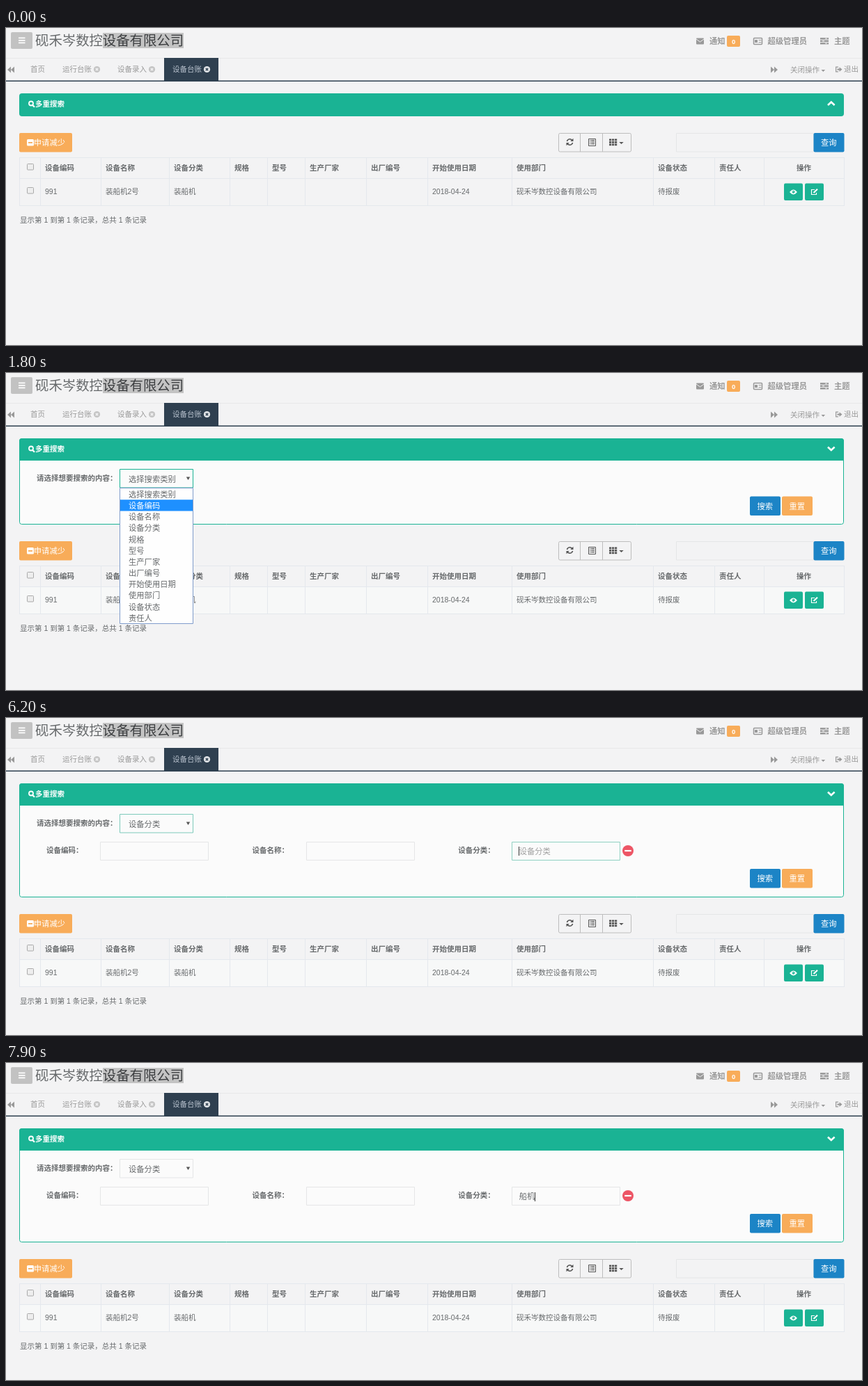
An HTML page with a canvas for the animation above (8 s loop, 1229 px wide and 456 px high).

```html
<!DOCTYPE html>
<html lang="zh-CN">
<head>
<meta charset="utf-8">
<title>设备台账</title>
<style>
html, body { margin: 0; width: 100%; height: 100%; overflow: hidden; background: #f3f3f4; }
canvas { display: block; }
</style>
</head>
<body>
<canvas id="stage" width="1229" height="456"></canvas>
<script>
const ctx = document.getElementById('stage').getContext('2d');
const LOOP = 8000, PAGE = '#f3f3f4', INK = '#676a6c', GREEN = '#1ab394', ORANGE = '#f8ac59',
  BLUE = '#1c84c6', NAVY = '#2f4050', GRAY = '#999', EDGE = '#e5e6e7', SMALL = 10.5, MEDIUM = 11.3;

const OPTIONS = ['选择搜索类别', '设备编码', '设备名称', '设备分类', '规格', '型号', '生产厂家',
  '出厂编号', '开始使用日期', '使用部门', '设备状态', '责任人'];
const COMPANY = ['砚禾岑数控', '设备有限公司'];
const COLUMNS = [[49, '设备编码', '991'], [136, '设备名称', '装船机2号'], [234, '设备分类', '装船机'],
  [321, '规格'], [375, '型号'], [429, '生产厂家'], [517, '出厂编号'], [605, '开始使用日期', '2018-04-24'],
  [726, '使用部门', COMPANY.join('')], [929, '设备状态', '待报废'], [1017, '责任人'], [1088]];
const TREE = [[0, '顶级节点'], [1, '门机'], [1, '船机'], [2, '卸船机'], [2, '装船机'],
  [1, '测试使用数据'], [1, 'dsfasfas'], [2, '222']];

// Highlighted option over time; -1 means the list is closed
const POPUP = [[0, -1], [1500, 0], [1800, 1], [2100, -1], [2900, 1], [3000, 0], [3100, 2], [3700, -1],
  [4400, 2], [4700, 0], [4800, 1], [4900, 3], [5400, -1]];
const FIELDS = [[0, 0], [2100, 1], [3700, 2], [5400, 3]];

const valueAt = (keys, t) => keys.filter(k => k[0] <= t).pop()[1];
const clamp = v => Math.min(1, Math.max(0, v));
const swing = p => 0.5 - Math.cos(Math.PI * clamp(p)) / 2;

function text(str, x, y, size = SMALL, color = INK, bold = false) {
  ctx.font = `${bold ? 'bold ' : ''}${size}px "Liberation Sans", "Noto Sans CJK SC", "Noto Sans CJK", sans-serif`;
  ctx.fillStyle = color;
  ctx.fillText(str, x, y + size * 0.38);
}
function rect(x, y, w, h, fill, r = 0) {
  ctx.fillStyle = fill;
  ctx.beginPath();
  ctx.roundRect(x, y, w, h, r);
  ctx.fill();
}
function frame(x, y, w, h, color, r = 0, width = 1) {
  ctx.strokeStyle = color;
  ctx.lineWidth = width;
  ctx.beginPath();
  ctx.roundRect(x + 0.5, y + 0.5, w - 1, h - 1, r);
  ctx.stroke();
}
function line(points, color, width = 1) {
  ctx.strokeStyle = color;
  ctx.lineWidth = width;
  ctx.beginPath();
  points.forEach(([x, y]) => ctx.lineTo(x, y));
  ctx.stroke();
}
function shape(points, fill) {
  ctx.fillStyle = fill;
  ctx.beginPath();
  points.forEach(([x, y]) => ctx.lineTo(x, y));
  ctx.fill();
}
function disc(x, y, r, fill) {
  ctx.fillStyle = fill;
  ctx.beginPath();
  ctx.arc(x, y, r, 0, 7);
  ctx.fill();
}
function arc(x, y, r, from, to, color, width) {
  ctx.strokeStyle = color;
  ctx.lineWidth = width;
  ctx.beginPath();
  ctx.arc(x, y, r, from, to);
  ctx.stroke();
}
function cross(x, y, r, color, width) {
  line([[x - r, y - r], [x + r, y + r]], color, width);
  line([[x - r, y + r], [x + r, y - r]], color, width);
}
function caretDown(x, y, r, color) {
  shape([[x - r, y - r / 2], [x + r, y - r / 2], [x, y + r / 2]], color);
}
function button(label, x, y, color) {
  rect(x, y, 44, 27.5, color, 2);
  text(label, x + 10.5, y + 14, MEDIUM, '#fff');
}
function doubleArrow(x, y, dir) {
  for (const dx of [0, 5]) {
    const left = x + dx;
    const [back, tip] = dir > 0 ? [left, left + 5] : [left + 5, left];
    shape([[back, y - 4.5], [tip, y], [back, y + 4.5]], GRAY);
  }
}

function drawHeader() {
  rect(7, 6, 31, 24, '#c2c2c2', 2);
  for (const y of [13.5, 17, 20.5]) rect(18, y, 9.5, 1.7, '#fff');
  rect(139, 7, 116, 22, '#c3c3c3');
  text(COMPANY[0], 42, 18, 19.4, INK);
  text(COMPANY[1], 138.8, 18, 19.4, '#3c3e40');

  rect(991, 14.5, 11, 9, GRAY, 1);
  line([[991, 16], [996.5, 20], [1002, 16]], PAGE);
  text('通知', 1010, 19, MEDIUM, GRAY, true);
  rect(1035, 11, 19, 16, ORANGE, 2);
  text('0', 1042, 19.3, 9.5, '#fff', true);
  frame(1073, 14, 13, 10, GRAY, 1, 1.5);
  rect(1075, 17, 4, 4, GRAY);
  for (const y of [17, 20]) rect(1080.5, y, 4, 1, GRAY);
  text('超级管理员', 1093.5, 19, MEDIUM, GRAY, true);
  for (const y of [14, 17.5, 21]) {
    rect(1169, y, 12, 2.5, GRAY);
    rect(y === 17.5 ? 1172 : 1176, y + 0.7, 3, 1, PAGE);
  }
  text('主题', 1189, 19, MEDIUM, GRAY, true);

  rect(0, 43, 1229, 1, '#e7e7e8');
  doubleArrow(2, 60, -1);
  text('首页', 35, 59, SMALL, GRAY);
  rect(227, 43, 78, 33, NAVY);
  [['运行台账', 81], ['设备录入', 160], ['设备台账', 239]].forEach(([label, x], i) => {
    const active = i === 2;
    text(label, x, 59, SMALL, active ? '#b9c2ce' : GRAY);
    disc(x + 49.5, 59.5, 4.6, active ? '#e4e7ea' : '#c4c4c4');
    cross(x + 49.5, 59.5, 1.7, active ? NAVY : PAGE, 1.3);
  });
  doubleArrow(1098, 60, 1);
  text('关闭操作', 1126, 60, SMALL, GRAY);
  caretDown(1173.3, 61.5, 2.8, GRAY);
  line([[1195, 56.2], [1191.6, 56.2], [1191.6, 62.8], [1195, 62.8]], GRAY, 1.2);
  rect(1193.5, 58.5, 3.5, 2.2, GRAY);
  shape([[1196.5, 56.2], [1200.5, 59.6], [1196.5, 63]], GRAY);
  text('退出', 1203, 59.5, SMALL, GRAY);
  rect(0, 75.6, 1229, 1.4, NAVY);
}

function drawField(i, t) {
  const x = 58 + i * 295.6, category = i === 2;
  const focused = category && t >= 6200 && t < 7300;
  text(OPTIONS[i + 1] + '：', x, 190, SMALL, INK, true);
  frame(Math.round(x + 77), 178, 156, 27, focused ? '#8fd1c2' : EDGE);
  if (category) {
    if (t < 7300) text('设备分类', x + 87.5, 191.5, MEDIUM, '#a0a0a0');
    else text('船机', x + 87.5, 191.5, MEDIUM);
    if (t >= 6200 && t < 6300) rect(736, 185, 1, 13, '#333');
    if (t >= 7900) rect(759, 186, 1, 13, '#333');
  }
  const hovered = category ? (t >= 5800 && t < 6300) || t >= 7700 : i === 0 && t < 2400;
  if (hovered) {
    disc(x + 243.8, 191, 8, '#ed5565');
    rect(x + 239, 189.9, 9.6, 2.2, '#fff');
  }
}

function drawPanel(t, height, fields) {
  const open = height > 0;
  if (open) {
    rect(19, 94, 1184, 33 + height, '#fbfbfb', 3);
    ctx.save();
    ctx.beginPath();
    ctx.rect(19, 126, 1184, height);
    ctx.clip();
    text('请选择想要搜索的内容：', 44, 151, SMALL, INK, true);
    const fading = (t >= 1500 && t < 1600) || (t >= 6200 && t < 6300);
    const border = fading ? '#7dcabb' : t >= 1500 && t < 6200 ? GREEN : EDGE;
    frame(163, 138, 106, 27.5, border);
    text(OPTIONS[fields], 176, 152.5, MEDIUM);
    shape([[258.8, 149.5], [264.2, 149.5], [261.5, 154]], '#555');
    for (let i = 0; i < fields; i++) drawField(i, t);
    const y = fields ? 217 : 177.5;
    button('搜索', 1068, y, BLUE);
    button('重置', 1114, y, ORANGE);
    ctx.restore();
    frame(19, 94, 1184, 33 + height, GREEN, 3);
  }
  rect(19, 94, 1184, open ? 32 : 33, GREEN, open ? [4, 4, 0, 0] : 4);
  arc(36, 108.5, 3, 0, 7, '#fff', 1.8);
  line([[38, 110.7], [41, 113.7]], '#fff', 2.2);
  text('多重搜索', 42, 109.5, SMALL, '#fff', true);
  const tip = open ? 111 : 106.5, wing = open ? 106.5 : 111;
  line([[1180, wing], [1184.8, tip], [1189.6, wing]], '#fff', 2.6);
}

function drawToolbar() {
  rect(19, 151, 76, 27.5, ORANGE, 2);
  rect(30, 160, 10, 9.5, '#fff', 1.5);
  rect(32, 164, 6, 1.8, ORANGE);
  text('申请减少', 39.8, 165, MEDIUM, '#fff');

  frame(793, 151, 105, 27.5, '#bdbdbd', 2);
  for (const x of [824, 856]) rect(x, 151, 1, 27, '#bdbdbd');
  const dark = '#555';
  arc(809.5, 164, 4.2, 3.4, 5.9, dark, 1.6);
  arc(809.5, 164, 4.2, 0.25, 2.75, dark, 1.6);
  shape([[814.5, 158.8], [814.5, 163], [810.3, 163]], dark);
  shape([[804.5, 169.2], [804.5, 165], [808.7, 165]], dark);
  frame(836, 159, 11, 11, dark);
  for (const y of [161, 163.5, 166]) {
    rect(838, y, 1.2, 1.2, dark);
    rect(840, y, 5, 1.2, dark);
  }
  for (let i = 0; i < 9; i++) rect(866 + i % 3 * 4, 159.5 + Math.floor(i / 3) * 3.5, 3.2, 2.7, dark);
  caretDown(883.5, 165.5, 3.2, dark);

  frame(962, 151, 198, 27.5, EDGE);
  button('查询', 1159.5, 151, BLUE);
}

function drawTable(open) {
  const grid = '#e4e8ed';
  if (open) rect(19, 217, 1184, 38, '#f7f8f8');
  for (const y of [186, 216, 255]) rect(19, y, 1185, 1, grid);
  for (const x of [19, 1203, ...COLUMNS.map(c => c[0])]) rect(x, 186, 1, 70, grid);
  for (const y of [195, 229]) {
    rect(30, y, 10, 9.5, '#eee', 1);
    frame(30, y, 10, 9.5, '#aaa', 1);
  }
  for (const [x, title = '', value = ''] of COLUMNS) {
    text(title, x + 7, 201.5, SMALL, INK, true);
    text(value, x + 7, 235.5);
  }
  text('操作', 1135, 201.5, SMALL, INK, true);

  for (const x of [1117, 1147]) rect(x, 223.5, 27, 24.5, GREEN, 2);
  shape([[1125, 236], [1128, 233.2], [1130.5, 232.6], [1133, 233.2], [1136, 236],
    [1133, 238.8], [1130.5, 239.4], [1128, 238.8]], '#fff');
  disc(1130.5, 235.7, 2, GREEN);
  disc(1130, 235.2, 0.7, '#fff');
  line([[1161, 232.5], [1156.5, 232.5], [1156.5, 239.5], [1163.5, 239.5], [1163.5, 237]], '#fff', 1.2);
  line([[1159.5, 237], [1165, 231.8]], '#fff', 2.2);

  text('显示第 1 到第 1 条记录，总共 1 条记录', 20, 276.5);
}

function drawPopup(active) {
  rect(163, 165, 106, 196, '#fefefe');
  OPTIONS.forEach((label, i) => {
    const y = 166 + i * 16.18;
    if (i === active) rect(164, y, 104, 16.2, '#1e90ff');
    text(label, 176, y + 8.5, MEDIUM, i === active ? '#fff' : INK);
  });
  frame(163, 165, 106, 196, '#7f9ccb');
}

function drawTree(hover) {
  rect(506, 161, 211, 185, '#fbfbfb');
  const rowY = i => 182.5 + i * 19.4;
  ctx.setLineDash([1, 1]);
  const dots = '#999';
  line([[532.5, 174], [532.5, 183]], dots);
  line([[551.5, 192], [551.5, rowY(6)]], dots);
  line([[571.5, 231], [571.5, rowY(4)]], dots);
  line([[571.5, 308], [571.5, rowY(7)]], dots);
  TREE.forEach(([level], i) => {
    const x = 532.5 + level * 19.5 - (level ? 19.5 : 0), y = Math.round(rowY(i)) + 0.5;
    line([[x + (level ? 0 : 3), y], [x + 10, y]], dots);
  });
  ctx.setLineDash([]);
  if (hover) {
    rect(562, 211.5, 45, 19.5, hover > 1 ? '#e7f4f9' : '#f1f8fa', 1);
    frame(562, 211.5, 45, 19.5, '#d9e8ee', 1);
  }
  TREE.forEach(([level, label], i) => {
    const x = 547 + level * 19.5, y = rowY(i);
    if ([0, 2, 6].includes(i)) {
      const ax = level ? 554 : 535;
      shape([[ax, y - 2.5], [ax, y + 3.5], [ax - 6, y + 3.5]], '#555');
    }
    rect(x + 1, y - 5, 6, 3, '#777');
    rect(x, y - 3, 12.5, 9, '#777');
    text(label, x + 16.3, y);
  });
}

function drawDialog(t) {
  const closing = t >= 7300;
  const p = clamp((t - 6250) / 300);
  const scale = closing ? 1.04 : 0.5 + swing(p) / 2;
  if (!closing) rect(0, 77, 1229, 379, 'rgba(0,0,0,.3)');
  ctx.save();
  ctx.beginPath();
  ctx.rect(0, 77, 1229, 379);
  ctx.clip();
  ctx.globalAlpha = closing ? 0.7 : p;
  ctx.translate(611, 291.5);
  ctx.scale(scale, scale);
  ctx.translate(-611, -291.5);
  ctx.shadowColor = 'rgba(0,0,0,.3)';
  ctx.shadowBlur = 40;
  rect(490, 110, 242, 363, '#f4f4f4', 1);
  ctx.shadowColor = 'transparent';
  rect(490, 110, 242, 33, '#f8f8f8');
  rect(490, 143, 242, 1, '#eee');
  text('选择分类', 506, 128, MEDIUM, '#333');
  cross(712.8, 128.3, 4.2, '#333', 1.4);
  if (t >= 6700) drawTree(t >= 7100 ? 2 : t >= 7000 ? 1 : 0);
  ctx.restore();
}

function render(t) {
  const fields = valueAt(FIELDS, t), active = valueAt(POPUP, t);
  const height = t < 600 ? 0 : fields ? 131 : 91 * swing((t - 550) / 400);
  rect(0, 0, 1229, 456, PAGE);
  drawHeader();
  drawPanel(t, height, fields);
  ctx.save();
  ctx.translate(0, Math.round(height));
  drawToolbar();
  drawTable(height > 0);
  ctx.restore();
  if (active >= 0) drawPopup(active);
  if (t >= 6300 && t < 7400) drawDialog(t);
}

function tick() {
  render(Math.floor(performance.now() % LOOP / 100) * 100);
  requestAnimationFrame(tick);
}
tick();
</script>
</body>
</html>
```
